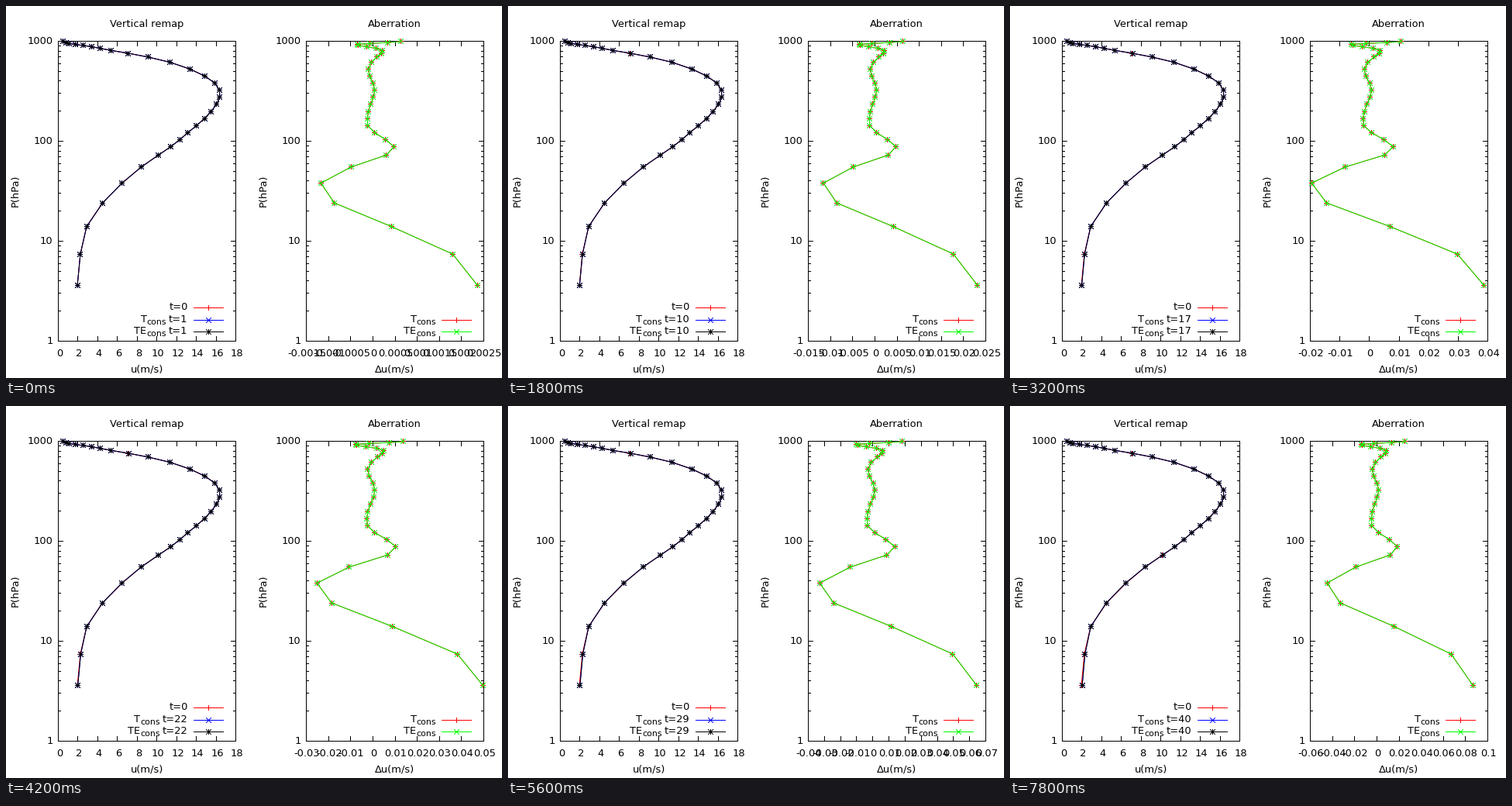
Recreate the animation shown at these times as a matplotlib script. Size 640 by 480 pixels, loop 8000 ms.

```python
import math
import numpy as np
import matplotlib.pyplot as plt
from matplotlib.animation import FuncAnimation
from matplotlib.collections import LineCollection

W, H, DPI = 640, 480, 100
PX = 72 / DPI                      # points per pixel
STEPS, INTERVAL = 40, 200
TOP, BOTTOM = 45.5, 432.5
LEFT, RIGHT = (67.5, 296.5), (387.5, 616.5)
ROWS = (389.5, 405.5, 420.5)       # legend lines
DRIFT = 0.004 / 229                # unit of wind drift per step
RED, GREEN, BLUE, BLACK = "red", "#00ff00", "blue", "black"


def bend(k, knots, flat=False):
    """Cubic through the knots; flat makes every knot a turning point."""
    x, y = np.array(knots).T
    slope = np.zeros_like(y) if flat else np.gradient(y, x)
    j = np.clip(np.searchsorted(x, k, "right") - 1, 0, len(x) - 2)
    h = x[j + 1] - x[j]
    s = np.clip((k - x[j]) / h, 0, 1)
    ease = s * s * (3 - 2 * s)
    return (y[j] + (y[j + 1] - y[j]) * ease
            + h * s * (1 - s) * (slope[j] * (1 - s) - slope[j + 1] * s))


# 30 levels, widely spaced aloft, even in the middle, dense at the ground
K = np.arange(30)
aloft = np.maximum(7 - K, 0)
ground = np.minimum(29 - K, 11)
Y = (45.9 + 1.2 * ground + 22.4 * (ground / 11) ** 4.4
     + 9.09 * np.clip(18 - K, 0, 11)
     + 8.24 * aloft + 2.476 * aloft ** 2)

WIND = bend(K, [(0, 1.93), (2, 2.87), (4, 6.47), (6, 10.17), (9, 13.15),
                (12, 15.5), (14, 16.37), (16, 15.9), (18, 13.38),
                (20, 9.14), (22, 5.37), (24, 3.41), (27, 1.12), (29, 0.47)])
SWING = bend(K, [(0.1, 135), (3.7, -70), (6.6, 28.5), (10.2, -7), (11.2, -7),
                 (15.1, 2.4), (17.8, -6), (21.7, 13), (25.7, -21.5),
                 (29.3, 37)], flat=True)
DAMP = 0.082 * np.exp(-K / 6)

plt.rcParams["font.family"] = "DejaVu Sans"

fig = plt.figure(figsize=(W / DPI, H / DPI), dpi=DPI, facecolor="white")
ax = fig.add_axes([0, 0, 1, 1])
ax.set_xlim(0, W)
ax.set_ylim(H, 0)
ax.axis("off")
ax.autoscale(False)


def to_x(value, side, lo, hi):
    return side[0] + (value - lo) / (hi - lo) * (side[1] - side[0])


def to_y(pressure):
    return BOTTOM - math.log10(pressure) / 3 * (BOTTOM - TOP)


def pixel(v):
    return np.floor(v) + 0.5


def text(x, y, s, ha="center", size=13, **kw):
    return ax.text(x, y, s, ha=ha, va=kw.pop("va", "baseline"),
                   fontsize=size * PX, **kw)


def segments(segs, color=BLACK, z=1):
    return ax.add_collection(LineCollection(
        segs, colors=color, linewidths=PX, capstyle="projecting",
        snap=False, zorder=z))


def curve(x, y, color, shape):
    """Line with a mark on every point: '+', 'x' or both."""
    line, = ax.plot(x, y, color=color, lw=PX, snap=False,
                    solid_capstyle="butt", zorder=2)
    arms = {"+": ((3, 0), (0, 3)), "x": ((3, 3), (3, -3))}
    segs = [[(px - dx, py - dy), (px + dx, py + dy)]
            for px, py in zip(pixel(x), pixel(y))
            for s in shape for dx, dy in arms[s]]
    return [line, segments(segs, color, 2)]


def sample(x, y, color, shape):
    ax.plot([x, x + 39], [y, y], color=color, lw=PX, snap=False,
            solid_capstyle="butt", zorder=2)
    curve(np.array([x + 19.5]), np.array([y]), color, shape)


def cons(right, y, name):
    """Name with the subscript 'cons', ending at the given x."""
    return [text(right, y + 5.5, "cons", "right", 11),
            text(right - 25.5, y + 2.5, name, "right")]


def tic_step(span):
    power = 10 ** math.floor(math.log10(span))
    room = 20 * power / span
    for limit, step in ((10, 0.2), (4, 0.5), (2, 1)):
        if room > limit:
            return step * power
    return 2 * power


def x_axis(side, lo, hi, step, shift):
    ticks = np.arange(round(lo / step), round(hi / step) + 1) * step
    xs = to_x(ticks, side, lo, hi)
    segs = []
    for x in pixel(xs):
        segs += [[(x, BOTTOM), (x, BOTTOM - 6)], [(x, TOP), (x, TOP + 6)]]
    labels = [text(x + shift, 452, f"{v:.6g}") for x, v in zip(xs, ticks)]
    return [segments(segs)] + labels


def frame(side, title, x_label):
    a, b = side
    segs = [[(a, TOP), (b, TOP)], [(a, BOTTOM), (b, BOTTOM)],
            [(a, TOP), (a, BOTTOM)], [(b, TOP), (b, BOTTOM)]]
    for decade in range(4):
        for k in range(1, 10 if decade < 3 else 2):
            y = pixel(to_y(k * 10 ** decade))
            size = 6 if k == 1 else 3
            segs += [[(a, y), (a + size, y)], [(b, y), (b - size, y)]]
        text(a - 7, to_y(10 ** decade) + 3.5, str(10 ** decade), "right")
    segments(segs)
    mid = (a + b) / 2
    text(mid - 0.2, 27, title)
    text(mid, 473, x_label)
    text(a - 55.5, 238, "P(hPa)", va="center", rotation=90)


frame(LEFT, "Vertical remap", "u(m/s)")
frame(RIGHT, "Aberration", "Δu(m/s)")
x_axis(LEFT, 0, 18, 2, 1.5)
curve(to_x(WIND, LEFT, 0, 18), Y, RED, "+")

text(234.5, ROWS[0] + 2.5, "t=0", "right")
for row, color, shape in zip(ROWS, (RED, BLUE, BLACK), ("+", "x", "+x")):
    sample(242, row, color, shape)
for row, name, color, shape in zip(ROWS[1:], ("T", "TE"), (RED, GREEN), "+x"):
    cons(555, row, name)
    sample(562, row, color, shape)

moving = []


def update(i):
    while moving:
        moving.pop().remove()
    t = i + 1
    delta = t * DRIFT * SWING * (1 - DAMP * i / (STEPS - 1))

    x = to_x(WIND + delta, LEFT, 0, 18)
    moving.extend(curve(x, Y, BLUE, "x"))
    moving.extend(curve(x, Y, BLACK, "+x"))

    step = tic_step(np.ptp(delta))
    lo = math.floor(delta.min() / step) * step
    hi = math.ceil(delta.max() / step) * step
    moving.extend(x_axis(RIGHT, lo, hi, step, 0.8))
    x = to_x(delta, RIGHT, lo, hi)
    moving.extend(curve(x, Y, RED, "+"))
    moving.extend(curve(x, Y, GREEN, "x"))

    end = 207 if t < 10 else 198.5
    for row, name in zip(ROWS[1:], ("T", "TE")):
        moving.append(text(234.5, row + 2.5, f"t={t}", "right"))
        moving.extend(cons(end, row, name))
    return moving


anim = FuncAnimation(fig, update, frames=STEPS, interval=INTERVAL,
                     repeat=True, repeat_delay=0, blit=False)
plt.show()
```
